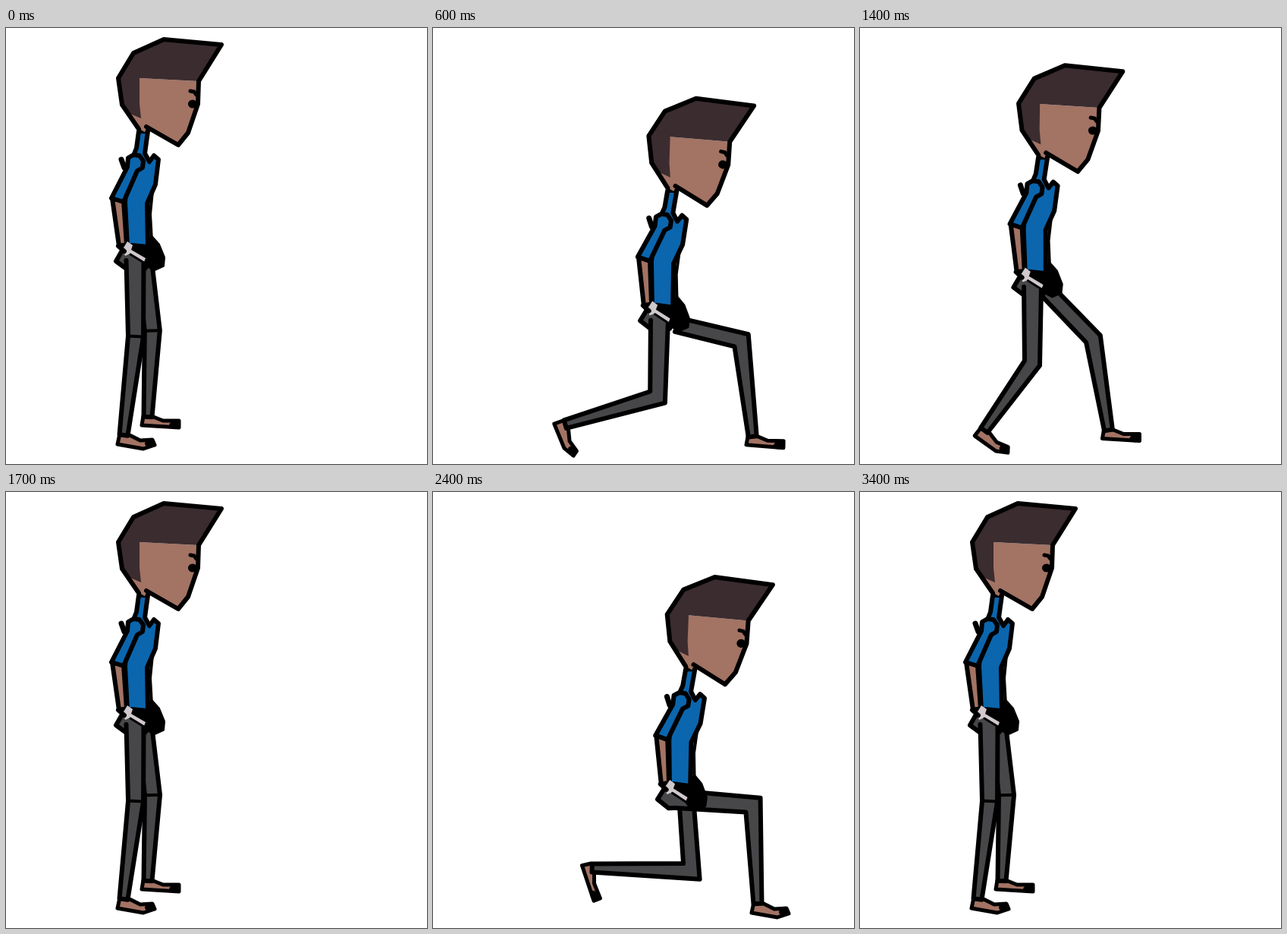
An HTML page with a canvas for the animation above (3600 ms loop, 555 by 574 pixels).

```html
<!DOCTYPE html>
<html>
<head>
<meta charset="utf-8">
<style>
html, body { margin: 0; width: 100%; height: 100%; overflow: hidden; background: #fff; }
canvas { display: block; }
</style>
</head>
<body>
<canvas id="stage" width="555" height="574"></canvas>
<script>
const ctx = document.getElementById('stage').getContext('2d');
const SKIN = '#a37364', HAIR = '#3b2c2f', SHIRT = '#0b66ae', PANTS = '#474749', PALE = '#cfc8cc';
const STEP = 100, LUNGE = 17, LAST = 34, LOOP = 3600;
const PLANTED = { x: 428, y: 542 };

// Standing pose of each leg; stretch and reach apply when it steps forward
const near = {
  hip: [170, 306], knee: [171, 406], ankle: [155, 536], thigh: 101, shin: 130, stretch: 0, reach: 0,
  width: 11.5, foot: [-5, -2, -8, 12, 26, 18, 41, 13, 38, 6, 22, 7, 6, -1]
};
const far = {
  hip: [183, 311], knee: [193, 399], ankle: [187, 512], thigh: 88, shin: 113.7, stretch: 14, reach: 10,
  width: 9.5, foot: [-6, -1, -8, 11, 41, 14, 41, 5, 20, 5, 5, -1]
};

function smooth(t, from, to) {
  const u = Math.max(0, Math.min(1, (t - from) / (to - from)));
  return u * u * (3 - 2 * u);
}
// Rises to 1 between a and b, falls back to 0 between c and d
const swell = (t, a, b, c, d) => smooth(t, a, b) - smooth(t, c, d);

function shape(p, fill, open, line = 6) {
  ctx.beginPath();
  for (let i = 0; i < p.length; i += 2) ctx.lineTo(p[i], p[i + 1]);
  if (!open) ctx.closePath();
  if (fill) { ctx.fillStyle = fill; ctx.fill(); }
  if (line) { ctx.lineWidth = line; ctx.stroke(); }
}

function dot(x, y, rx, ry) {
  ctx.beginPath();
  ctx.ellipse(x, y, rx, ry, 0, 0, 7);
  ctx.fillStyle = '#000';
  ctx.fill();
}

function drawLeg({ width, foot }, [hx, hy], [kx, ky], [ax, ay], turn) {
  ctx.setTransform(1, 0, 0, 1, ax, ay);
  ctx.rotate(turn * Math.PI / 180);
  shape(foot, SKIN, false, 5);
  dot(35, 11, 7, 5);
  ctx.resetTransform();

  const thigh = Math.atan2(ky - hy, kx - hx), shin = Math.atan2(ay - ky, ax - kx);
  const bend = shin - thigh, mid = thigh + bend / 2;
  const side = (x, y, dir, w) => [x - Math.sin(dir) * w, y + Math.cos(dir) * w];
  const knee = 10 / Math.cos(bend / 2);
  const left = side(kx, ky, mid, knee), right = side(kx, ky, mid, -knee);
  shape([...side(hx, hy, thigh, width), ...left, ...side(ax, ay, shin, 5.5),
    ...side(ax, ay, shin, -5.5), ...right, ...side(hx, hy, thigh, -width)], PANTS, true);
  if (Math.abs(bend) < .6) shape([...left, ...right], null, true, 4);
}

// Steps out with a raised foot and slides back; the knee follows from the bone lengths
function frontLeg(leg, t, at) {
  const w = swell(t, 1.5, 6.5, 12, 16.5);
  const lift = t < LUNGE / 2 ? Math.sin(Math.PI * w) : 0;
  const [hx0, hy] = at(...leg.hip), hx = hx0 + leg.reach * w;
  const ax = leg.ankle[0] + (PLANTED.x - leg.ankle[0]) * w;
  const ay = leg.ankle[1] + (PLANTED.y - leg.ankle[1]) * w - 38 * lift;
  const a = leg.thigh, b = leg.shin + leg.stretch * w, d = Math.hypot(ax - hx, ay - hy);
  const angle = Math.atan2(ay - hy, ax - hx) - Math.acos(Math.min(1, (a * a + d * d - b * b) / (2 * a * d)));
  drawLeg(leg, [hx, hy], [hx + a * Math.cos(angle), hy + a * Math.sin(angle)], [ax, ay], 15 * lift);
}

// Thigh stays in line with the body while the foot rolls up on its toes
function backLeg(leg, u, at) {
  const [x, y] = leg.ankle;
  drawLeg(leg, at(...leg.hip), at(...leg.knee), [x + 24 * u, y - 18 * u], 72 * u);
}

function torso() {
  shape([194, 205, 190, 245, 192, 280, 187, 280, 184, 235], SKIN, false, 4);
  shape([175, 136, 187, 136, 183, 165, 189, 176, 195, 168, 201, 173, 197, 206, 186, 231, 187, 289,
    160, 288, 157, 230, 160, 180, 168, 168, 172, 158], SHIRT);
  shape([153, 293, 145, 307, 160, 318, 184, 316, 186, 295], PANTS);
}

function arm() {
  shape([152, 173, 156, 184], null, true, 7);
  shape([140, 224, 149, 287, 159, 285, 155, 228], SKIN);
  shape([161, 171, 168, 167, 176, 168, 181, 175, 180, 184, 173, 188, 155, 229, 139, 224, 160, 183], SHIRT);
}

function hands() {
  shape([165, 285, 186, 287, 192, 275, 201, 285, 208, 302, 207, 313, 196, 318, 186, 313], '#000', false, 4);
  shape([154, 291, 160, 281, 167, 286, 165, 292, 184, 303, 182, 308, 164, 297, 157, 300], PALE, false, 0);
  shape([148, 287, 156, 294], null, true, 6);
  shape([164, 298, 182, 309], null, true, 3);
}

function head() {
  shape([176, 66, 254, 70, 253, 100, 240, 138, 227, 155, 186, 130, 183, 137, 174, 132, 160, 110], SKIN, true, 0);
  shape([208, 15, 284, 22, 254, 70, 176, 66, 176, 100, 178, 119, 164, 113, 153, 101, 148, 66, 168, 33], HAIR, true, 0);
  shape([175, 133, 153, 101, 148, 66, 168, 33, 208, 15, 284, 22, 254, 70, 253, 100, 240, 138, 227, 154, 185, 130], null, true);
  shape([243, 83, 248, 84, 251, 88], null, true, 5);
  dot(246, 100, 6, 5.5);
}

function draw(n) {
  const t = n % LUNGE;
  const u = swell(t, 1, 8, 11.5, 15.7), drop = swell(t, 3.5, 7, 11, 16);
  const scale = 1 + .012 * u, lean = .042 * u;
  const c = Math.cos(lean) * scale, s = Math.sin(lean) * scale;
  // The lean turns about the crown of the head
  const e = 208 + 173 * u - c * 208 + s * 14, f = 14 + 97 * drop - s * 208 - c * 14;
  const at = (x, y) => [c * x - s * y + e, s * x + c * y + f];
  const body = () => ctx.setTransform(c, s, -s, c, e, f);
  const farLeads = n < LUNGE;

  ctx.resetTransform();
  ctx.fillStyle = '#fff';
  ctx.fillRect(0, 0, 555, 574);
  ctx.strokeStyle = '#000';
  ctx.lineJoin = 'round';
  ctx.lineCap = 'round';

  if (farLeads) frontLeg(far, t, at); else backLeg(far, u, at);
  body();
  torso();
  if (farLeads) backLeg(near, u, at); else frontLeg(near, t, at);
  body();
  arm();
  hands();
  head();
}

function tick() {
  draw(Math.min(LAST, Math.floor(performance.now() % LOOP / STEP)));
  requestAnimationFrame(tick);
}
tick();
</script>
</body>
</html>
```
